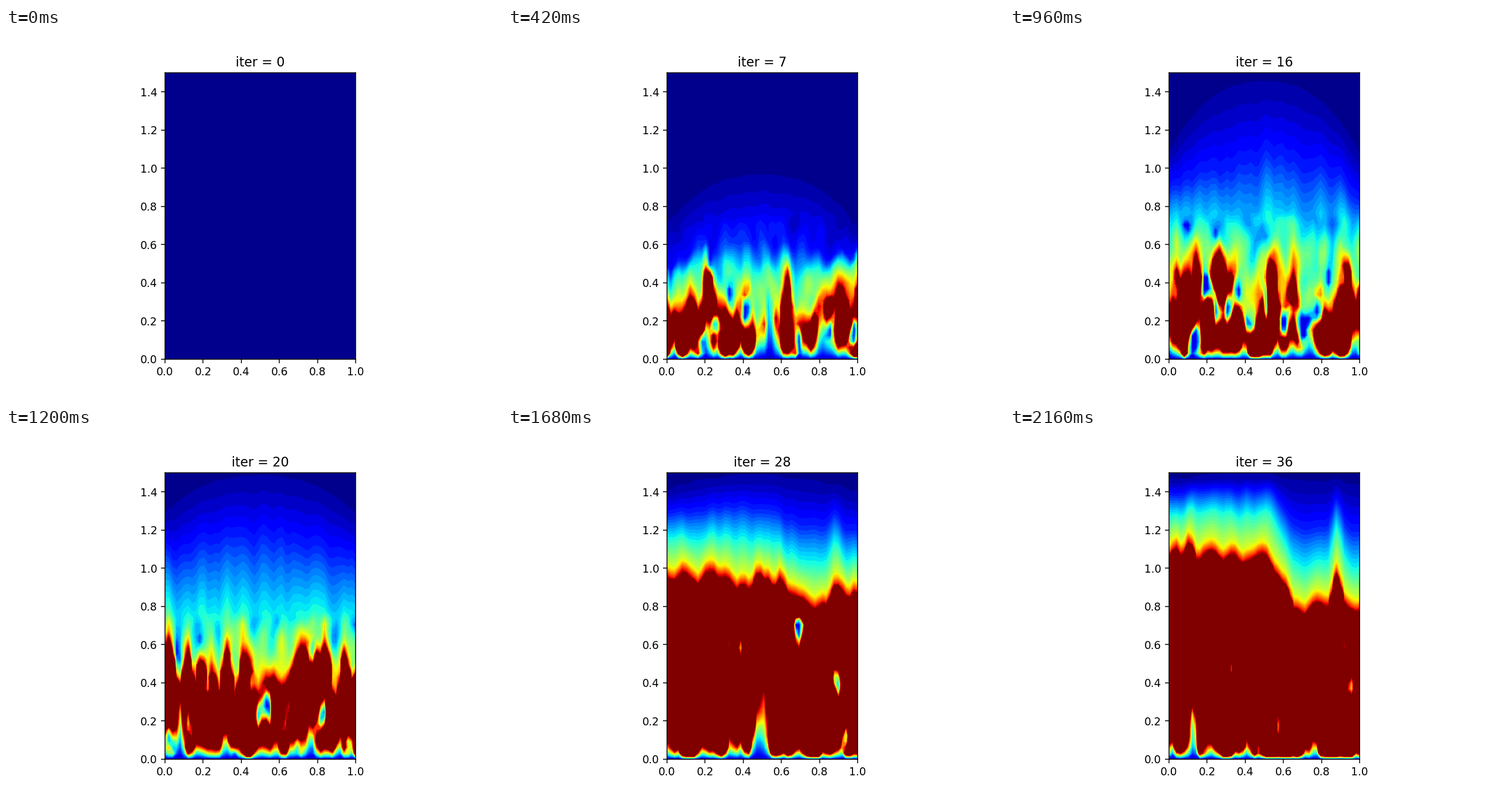
Animation, 864 px wide and 648 px high, one loop 2.22 s. Source, as a matplotlib script:

```python
import numpy as np
import matplotlib.pyplot as plt
from matplotlib.animation import FuncAnimation

FRAMES, STEP = 37, 60
N, BANDS = 50, 38
CEILING = 0.77  # no stirring above this height
X = np.linspace(0, 1, N)
Y = np.linspace(0, 1.5, N)
LEVELS = np.linspace(0, 1, BANDS + 1)
COLORS = plt.get_cmap("jet")(np.append((np.arange(BANDS) + 0.5) / BANDS, 1.0))

# How the layer grows: heights of falling values, then its shape and texture.
TIMES = (0, 7, 11, 16, 20, 28, 36)
GROWTH = {
    "hot": (0, 0.27, 0.33, 0.40, 0.50, 0.94, 1.06),
    "warm": (0, 0.47, 0.57, 0.65, 0.73, 1.14, 1.28),
    "cool": (0, 0.61, 0.90, 1.03, 1.14, 1.31, 1.40),
    "edge": (0, 0.96, 1.31, 1.45, 1.48, 1.48, 1.48),
    "dome": (0, 0.27, 0.46, 0.38, 0.20, 0.08, 0.02),
    "slope": (0, 0, 0, 0, 0.02, 0.12, 0.28),
    "jag": (0, 0.08, 0.09, 0.10, 0.09, 0.03, 0.03),
    "fill": (1, 0.85, 0.90, 0.75, 1.0, 1.7, 1.8),
    "base": (0, 0.05, 0.04, 0.07, 0.06, 0.03, 0.02),
}


def streaks(seed):
    """Unit-variance noise, a few cells wide and stretched upwards."""
    z = np.random.default_rng(seed).normal(size=(N + 10, N + 4))
    for axis, size in ((0, 11), (1, 5)):
        k = np.hanning(size)
        k /= np.linalg.norm(k)
        z = np.apply_along_axis(np.convolve, axis, z, k, "valid")
    return z


def noise(n, seed, span=4):
    """Noise that keeps turning from one pattern into the next."""
    k, f = divmod(n, span)
    a = np.pi / 2 * f / span
    return np.cos(a) * streaks((seed, k)) + np.sin(a) * streaks((seed, k + 1))


def field(n):
    if n == 0:
        return np.zeros((N, N))
    g = {k: np.interp(n, TIMES, v) for k, v in GROWTH.items()}
    mix = noise(n, 1)
    tips, tails, floor = noise(n, 2)[[0, 20, 40]]

    side = np.abs(2 * X - 1) ** 2.5
    s = np.clip((X - 0.5) / 0.2, 0, 1)
    plume = np.exp(-(((X - 0.88) / 0.03) ** 2))
    drop = g["slope"] * (s * s * (3 - 2 * s) - 0.7 * plume)

    hot = g["hot"] + g["jag"] * tips - drop
    warm = np.maximum(g["warm"] + g["jag"] * (0.4 * tips + 0.4 * tails) - drop, hot + 0.11)
    cool = g["cool"] + 0.3 * g["jag"] * tails - 0.5 * g["dome"] * side - 0.7 * drop
    cool = np.maximum(cool, warm + 0.04)
    edge = np.maximum(g["edge"] - g["dome"] * side - 0.1 * drop, cool + 0.05)
    base = np.maximum(g["base"] * np.exp(0.9 * floor), 0.004)

    z = np.empty((N, N))
    for j in range(N):
        gap = edge[j] - cool[j]
        ys = (hot[j] - 0.05, hot[j], hot[j] + 0.07, warm[j], cool[j],
              cool[j] + 0.35 * gap, cool[j] + 0.63 * gap, edge[j], edge[j] + 0.2)
        fall = np.interp(Y, ys, (2.2, 1, 0.62, 0.4, 0.16, 0.106, 0.065, 0.026, 0))
        z[:, j] = np.minimum(fall, 0.05 + 0.95 * Y / base[j])

    stir = np.clip((CEILING - Y) / 0.06, 0, 1)[:, None]
    z *= 1 + 0.2 * stir * np.clip(mix, -2, 2)
    pockets = 1 + 0.75 * (g["fill"] + stir * mix)
    return np.clip(np.minimum(z, np.maximum(pockets, 0.1)), 0, 2)


fig = plt.figure(figsize=(6.4, 4.8), dpi=135, facecolor="white")
fig.subplots_adjust(left=0.1252)
ax = fig.add_subplot()
ax.set_aspect("equal")
plot = None


def update(n):
    global plot
    if plot is not None:
        plot.remove()
    plot = ax.contourf(X, Y, field(n), levels=LEVELS, colors=COLORS, extend="max")
    ax.set(xlim=(0, 1), ylim=(0, 1.5), title=f"iter = {n}")


anim = FuncAnimation(fig, update, frames=FRAMES, interval=STEP, repeat=True, repeat_delay=0)
plt.show()
```
